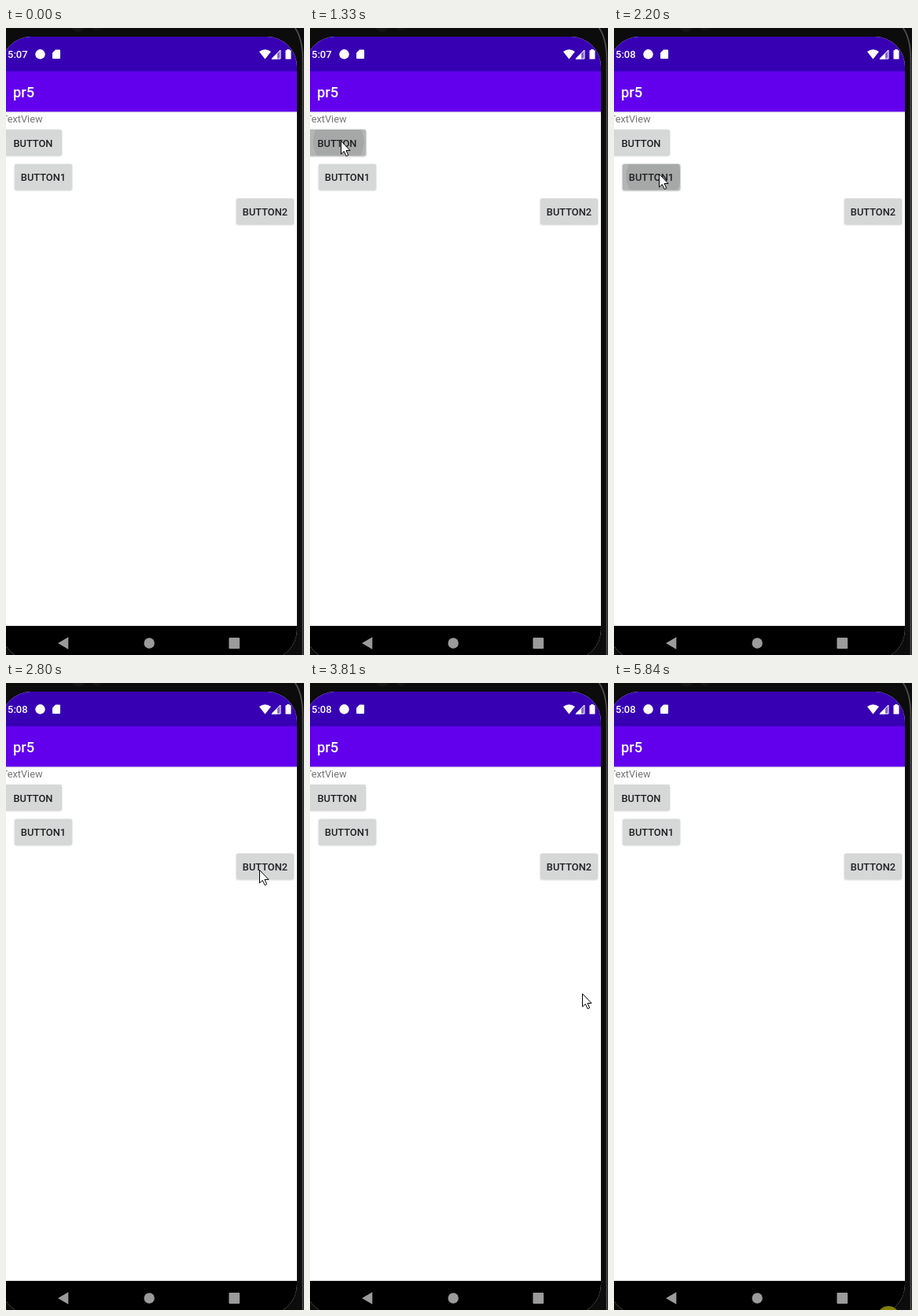
An HTML page that plays this animation: 379x796 px, repeating every 5910 ms.

```html
<!DOCTYPE html>
<html lang="en">
<head>
<meta charset="utf-8">
<title>pr5</title>
<style>
  html, body { margin: 0; width: 100%; height: 100%; overflow: hidden; background: #0c0c0c; }
  svg { display: block; width: 379px; height: 796px; }
  text { font-family: Roboto, "Noto Sans", sans-serif; }
  .label { font-size: 12.85px; font-weight: 500; fill: #202124; text-anchor: middle; }
  .face { fill: #d6d7d7; }
</style>
</head>
<body>
<svg viewBox="0 0 379 796">
  <defs>
    <clipPath id="screen"><rect x="-6" y="11" width="376" height="791" rx="38"/></clipPath>
    <linearGradient id="drop" x1="0" y1="0" x2="0" y2="1">
      <stop offset="0" stop-opacity=".12"/><stop offset="1" stop-opacity="0"/>
    </linearGradient>
    <filter id="soft" x="-20%" y="-30%" width="140%" height="170%"><feGaussianBlur stdDeviation="1"/></filter>
  </defs>

  <!-- phone body -->
  <rect width="379" height="796" fill="#0c0c0c"/>
  <circle cx="92" cy="-4" r="9" fill="#161618"/>
  <circle cx="116" cy="-2" r="6" fill="#141416"/>
  <path d="M367 -1Q377.500 13 377.500 42V796" fill="none" stroke="#4c4c4c" stroke-width="1.800"/>

  <g clip-path="url(#screen)">
    <rect x="-6" y="11" width="376" height="791" fill="#fff"/>
    <rect x="-6" y="11" width="376" height="44" fill="#3700b3"/>
    <rect x="-6" y="55" width="376" height="51.300" fill="#6200ee"/>
    <rect x="-6" y="106.300" width="376" height="2" fill="url(#drop)"/>
    <rect x="-6" y="759" width="376" height="43" fill="#000"/>
  </g>

  <!-- status bar -->
  <g fill="#fff">
    <text id="clock" x="2" y="38" font-size="13" font-weight="500">5:07</text>
    <circle cx="43.500" cy="33.300" r="6.200"/>
    <path d="M63 27.500H68Q69 27.500 69 28.500V38Q69 39 68 39H60Q59 39 59 38V31.500Z"/>
    <path d="M322 30Q329.500 24.500 337 30L329.500 39.500Z"/>
    <path d="M349 28V39H338Z" fill-opacity=".4" stroke="#fff"/>
    <path d="M345 32V39.500H337.500Z"/>
    <path d="M357.300 27H360.700V28.300H362.500V39.500H355.500V28.300H357.300Z"/>
  </g>

  <text x="9" y="88" font-size="18.300" font-weight="500" fill="#fff">pr5</text>
  <text x="-5.400" y="120" font-size="12.800" fill="#757575">TextView</text>
  <g id="buttons"></g>

  <!-- navigation bar -->
  <g fill="#9b9b9b">
    <path d="M66 781L79.300 773.300V788.700Z"/>
    <circle cx="182.200" cy="781" r="6.700"/>
    <rect x="283.500" y="774" width="13.700" height="14" rx="1"/>
  </g>

  <circle id="halo" cx="349" cy="805.600" r="14.600" fill="#808000"/>
  <path id="cursor" d="M.5 .5V17L4.300 13.500L7.200 19.600L9.700 18.500L7 12.500H12Z"
        fill="#fff" stroke="#000" stroke-linejoin="round"/>
</svg>
<script>
const LOOP = 5910, STEP = 100 / 3;
const GROW = 225, FADE_FROM = 185, FADE = 70;
const W = 73, H = 32.8, TOP = 129, PITCH = 43.75;
const $ = id => document.getElementById(id);
const mix = (a, b, k) => a + (b - a) * k;
const clamp = v => Math.max(0, Math.min(1, v));
const smooth = k => k * k * (3 - 2 * k);
const speedUp = k => k ** 1.6;

const buttons = [
  { text: 'BUTTON', x: -2, press: 1200 },
  { text: 'BUTTON1', x: 11, press: 2040 },
  { text: 'BUTTON2', x: 293, press: 3090 }
].map((b, i) => ({ ...b, y: TOP + i * PITCH }));

// Each move starts where the one before ended; y past 796 is off stage
const moves = [
  { at: 260, for: 530, to: [22, 123] },
  { at: 790, for: 270, to: [39, 143] },
  { at: 1460, for: 420, to: [57, 185] },
  { at: 2250, for: 540, to: [322, 237] },
  { at: 3480, for: 230, to: [347, 245] },
  { at: 3710, for: 205, to: [343, 800], ease: speedUp },
  { at: 4890, for: 0, to: [376, 778] },
  { at: 4890, for: 310, to: [51, 287] },
  { at: 5200, for: 370, to: [342, 800] }
];

function pointerAt(t) {
  let spot = [352, 800];
  for (const m of moves) {
    if (t < m.at) break;
    const k = (m.ease || smooth)(m.for ? clamp((t - m.at) / m.for) : 1);
    spot = spot.map((v, i) => mix(v, m.to[i], k));
  }
  return spot.map(Math.round);
}

$('buttons').innerHTML = buttons.map((b, i) => {
  const box = `x="${b.x}" width="${W}" height="${H}"`;
  return `
  <clipPath id="edge${i}"><rect ${box} y="${b.y}" rx="2"/></clipPath>
  <rect class="shade" ${box} y="${b.y + .6}" rx="2" filter="url(#soft)"/>
  <rect class="face" ${box} y="${b.y}" rx="2"/>
  <g class="ripple" clip-path="url(#edge${i})">
    <rect ${box} y="${b.y}" opacity=".16"/>
    <circle opacity=".08"/>
  </g>
  <text class="label" x="${b.x + W / 2}" y="${b.y + 21.5}">${b.text}</text>`;
}).join('');
const ripples = [...document.querySelectorAll('.ripple')];
const shades = [...document.querySelectorAll('.shade')];

function drawRipple(b, i, t) {
  const age = t - b.press, k = clamp(age / GROW);
  const level = clamp(age / 80) * (1 - clamp((age - FADE_FROM) / FADE));
  const [px, py] = pointerAt(b.press);
  const circle = ripples[i].lastElementChild;
  ripples[i].setAttribute('opacity', level);
  circle.setAttribute('cx', mix(px, b.x + W / 2, k));
  circle.setAttribute('cy', mix(py, b.y + H / 2, k));
  circle.setAttribute('r', mix(22, 40, k));
  shades[i].setAttribute('opacity', mix(.2, .45, level));
}

function draw(time) {
  const t = Math.floor((time + 10) / STEP) * STEP;
  $('cursor').setAttribute('transform', `translate(${pointerAt(t)})`);
  $('halo').style.display = time >= 5840 ? '' : 'none';
  $('clock').textContent = t < 2100 ? '5:07' : '5:08';
  buttons.forEach((b, i) => drawRipple(b, i, t));
}

const start = performance.now();
function tick() {
  draw((performance.now() - start) % LOOP);
  requestAnimationFrame(tick);
}
tick();
</script>
</body>
</html>
```
